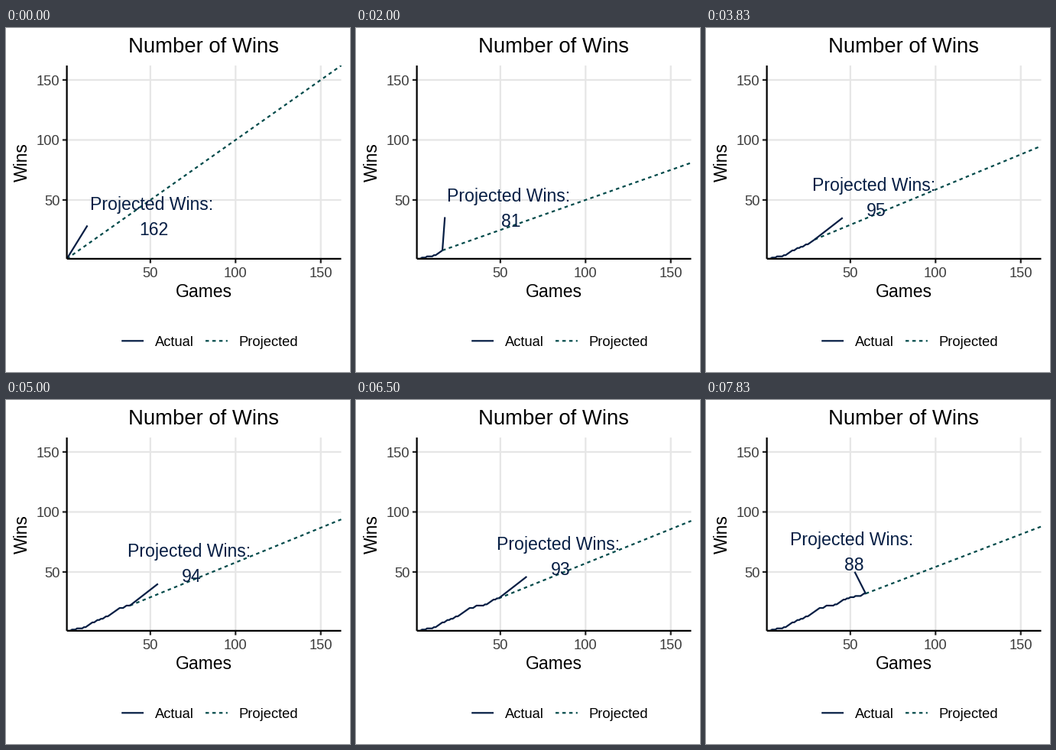
Write a matplotlib script that moves like this. It is 450 px wide and 450 px high and loops after 8000 ms.

```python
import numpy as np
import matplotlib.pyplot as plt
from matplotlib.animation import FuncAnimation
from matplotlib.patches import Rectangle

SIZE, DPI = 450, 150
LOOP, TICK, STEPS = 8000, 20, 48             # ms, ms, poses per loop
SEASON = 162
NAVY, TEAL = "#061E44", "#004A4A"
GRID, TICKS, DIGITS = "#E6E6E6", "#242424", "#3C3C3C"
LINE = 1.07                                  # points
LEFT, RIGHT, TOP, BOTTOM = 79.6, 438.5, 49.1, 301.9

RESULTS = ("WLLWLLWLLLWLWWWWLWWLWLWWLWWWWWWW"
           "LLWWLLLLWLWWWWLWLWLLWLLLWWL")
games = np.arange(1, len(RESULTS) + 1)
wins = np.cumsum([r == "W" for r in RESULTS])

plt.rcParams["font.family"] = "Liberation Sans"
fig = plt.figure(figsize=(SIZE / DPI, SIZE / DPI), dpi=DPI, facecolor="white")
ax = fig.add_axes([0, 0, 1, 1])
ax.set_xlim(0, SIZE)
ax.set_ylim(SIZE, 0)
ax.axis("off")


def px(game):
    return LEFT + (game - 1) * (RIGHT - LEFT) / (SEASON - 1)


def py(win):
    return BOTTOM - (win - 1) * (BOTTOM - TOP) / (SEASON - 1)


def line(xs, ys, color, z, dashed=False):
    (item,) = ax.plot(xs, ys, color=color, lw=LINE, zorder=z, snap=False,
                      solid_capstyle="butt")
    if dashed:
        item.set_dashes((2, 2))
    return item


def label(x, y, text, size, color="black", ha="center", **kw):
    return ax.text(x, y, text, fontsize=size, color=color, ha=ha,
                   va="baseline", zorder=6, **kw)


# Grid, ticks and axes
for v in (50, 100, 150):
    x, y = px(v), py(v)
    line([x, x], [TOP, BOTTOM], GRID, 1)
    line([LEFT, RIGHT], [y, y], GRID, 1)
    line([x, x], [BOTTOM, BOTTOM + 5.7], TICKS, 4)
    line([LEFT - 5.7, LEFT], [y, y], TICKS, 4)
    label(x, 326, str(v), 8.8, DIGITS)
    label(70.4, y + 6.6, str(v), 8.8, DIGITS, "right")
line([LEFT, RIGHT], [BOTTOM, BOTTOM], "black", 5)
line([LEFT, LEFT], [TOP, BOTTOM], "black", 5)

# Titles and legend
mid = (LEFT + RIGHT) / 2
label(mid - 0.6, 31.6, "Number of Wins", 13.2)
label(mid + 0.3, 352, "Games", 11)
label(28, (TOP + BOTTOM) / 2, "Wins", 11, rotation=90,
      rotation_mode="anchor")
line([151.2, 180], [409.3, 409.3], NAVY, 3)
line([261, 289.8], [409.3, 409.3], TEAL, 3, dashed=True)
label(195, 416, "Actual", 8.8, ha="left")
label(304.5, 416, "Projected", 8.8, ha="left")

# Moving parts
panel = Rectangle((LEFT, TOP), RIGHT - LEFT, BOTTOM - TOP,
                  transform=ax.transData)
actual = line([], [], NAVY, 3)
projected = line([], [], TEAL, 3, dashed=True)
pointer = line([], [], NAVY, 3)
for item in (actual, projected, pointer):
    item.set_clip_path(panel)
caption = label(0, 0, "Projected Wins:", 11.04, NAVY)
count = label(0, 0, "", 11.04, NAVY)


def label_center(game, x):
    """The label floats right of the point, then flips to its left limit."""
    if game >= 52:
        return 190.2
    return x + np.interp(game, [1, 10, 16, 27], [110.5, 93.3, 86.8, 77.8])


def update(tick):
    # Half a tick or more into a change counts as changed.
    step = int((tick + 0.7) * TICK * STEPS / LOOP)
    n = round(1 + step * (len(games) - 1) / (STEPS - 1))
    won = wins[n - 1]
    pace = won / n * SEASON
    x, y = px(n), py(won)

    actual.set_data(px(games[:n]), py(wins[:n]))
    projected.set_data([x, RIGHT], [y, py(pace)])

    cx = label_center(n, x)
    if x < cx - 83.6:
        end = cx - 83.6, y - 43.5
    else:
        end = cx + 0.47 * (x - cx) - 4.5, y - 28.5
    pointer.set_data([x, end[0]], [y, end[1]])

    caption.set_position((cx, y - 63.5))
    count.set_position((cx + 3.3, y - 30.5))
    count.set_text(str(round(pace)))
    return actual, projected, pointer, caption, count


anim = FuncAnimation(fig, update, frames=LOOP // TICK, interval=TICK,
                     repeat=True, repeat_delay=0)
plt.show()
```
